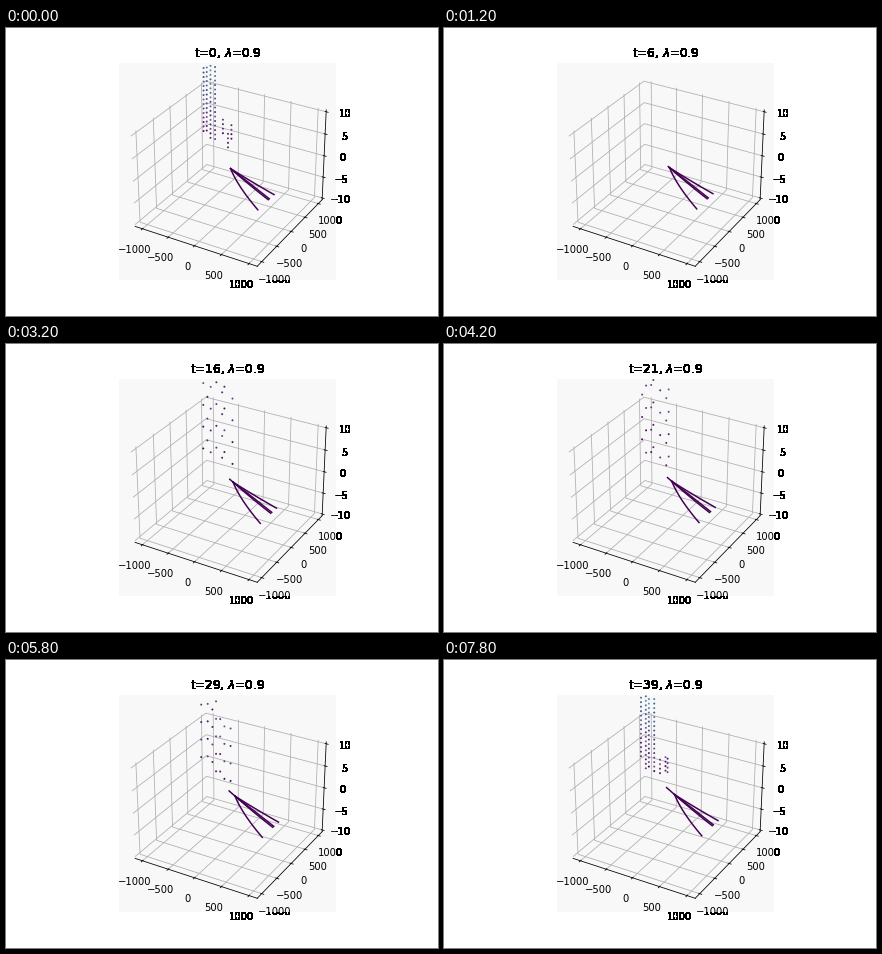
A matplotlib script for the animation above (8000 ms loop, 432 by 288 pixels).

```python
import numpy as np
import matplotlib.pyplot as plt
from matplotlib.animation import FuncAnimation
from matplotlib.transforms import Bbox

W, H, DPI = 432, 288, 72
STEPS = 40
PAPER = "#f8f8f8"
PURPLE = "#440154"
TOP = 36
REST = 9            # the dots vanish once in this many steps
MARGIN = 25 / 24


def dots(t):
    """Columns of dots rising from a slanted base, widest apart mid-loop."""
    rng = np.random.default_rng(t)
    gap = 4.5 + 18 * np.sin(np.pi * t / (STEPS - 1))
    pts = []
    if t % REST != 6:
        for x in np.linspace(197, 225, 7) + rng.uniform(-2, 2, 7):
            base = 100 + 0.6 * (x - 200) + rng.uniform(-5, 8)
            rows = 20 if x < 212 else 4
            pts += [(x, base - k * gap, k) for k in range(rows)
                    if base - k * gap > TOP]
    pts = np.array(pts).reshape(-1, 3)
    rgba = plt.cm.viridis(0.022 * pts[:, 2])
    rgba[:, 3] = rng.uniform(0.7, 1, len(pts))
    return pts[:, :2], rgba


def bezier(a, b, c):
    s = np.linspace(0, 1, 40)[:, None]
    a, b, c = map(np.array, (a, b, c))
    return (1 - s) ** 2 * a + 2 * s * (1 - s) * b + s ** 2 * c


def solid(img, dpi):
    """Turn every touched pixel fully black, for hard-edged text."""
    out = np.zeros_like(img)
    out[..., 3] = img[..., 3] > 0
    return out, 0, 0


fig = plt.figure(figsize=(W / DPI, H / DPI), dpi=DPI, facecolor="white")
fig.subplots_adjust(left=0.125, right=0.9, bottom=0.125, top=0.88)
ax = fig.add_subplot(projection="3d", facecolor=PAPER)
ax.view_init(30, -60)
side = np.array([-1, 1]) * MARGIN
ax.set(xlim=1100 * side, ylim=1100 * side, zlim=10 * side,
       xticks=range(-1000, 1001, 500), yticks=range(-1000, 1001, 500),
       zticks=range(-10, 11, 5))
axes3 = (ax.xaxis, ax.yaxis, ax.zaxis)
for axis in axes3:
    axis.set_pane_color(PAPER)

# Labels get hard edges wherever they leave the square plot area.
fig.canvas.draw()
area = ax.bbox
outside = [Bbox([[area.x1, 0], [W, H]]), Bbox([[0, 0], [W, area.y0]])]
for axis in axes3:
    for tick in axis.get_major_ticks():
        lab = tick.label1
        x, y = lab.get_transform().transform(lab.get_position())
        extent = lab.get_window_extent()
        for box in outside:
            if extent.overlaps(box):
                fig.text(x / W, y / H, lab.get_text(), fontsize=10,
                         ha=lab.get_ha(), va=lab.get_va(), clip_box=box,
                         clip_on=True, agg_filter=solid)

title = fig.text((area.x0 + area.x1) / 2 / W, (area.y1 + 6) / H, "",
                 fontsize=12, ha="center", va="baseline", agg_filter=solid)

over = fig.add_axes([0, 0, 1, 1])
over.set(xlim=(0, W), ylim=(H, 0))
over.axis("off")

APEX = np.array([224.6, 140.6])
CURVES = [
    bezier(APEX, (244, 153), (268, 166.6)),
    bezier(APEX, (242, 156), (262.2, 171.7)),
    bezier(APEX, (244, 155.5), (263.3, 170.8)),
    bezier(APEX, (231.5, 158), (251.8, 181.8)),
]
lines = [over.plot([], [], color=PURPLE, lw=1.5)[0] for _ in CURVES]
stem, = over.plot([], [], color=PURPLE, lw=1.5)
cloud = over.scatter([], [], s=4, linewidths=0)
for art in (*lines, stem, cloud):
    art.set_clip_box(area)


def update(t):
    title.set_text(rf"t={t}, $\lambda$=0.9")
    u = t / (STEPS - 1)
    shift = np.array([6, -6]) * u
    for line, pts in zip(lines, CURVES):
        line.set_data(*(pts + shift).T)
    tip = APEX + np.array([-2, -13]) * u
    stem.set_data(*np.array([tip, APEX + shift]).T)
    pts, rgba = dots(t)
    cloud.set_offsets(pts)
    cloud.set_facecolor(rgba)
    return [title, *lines, stem, cloud]


anim = FuncAnimation(fig, update, frames=STEPS, interval=200, repeat=True,
                     repeat_delay=0, blit=False)
plt.show()
```
